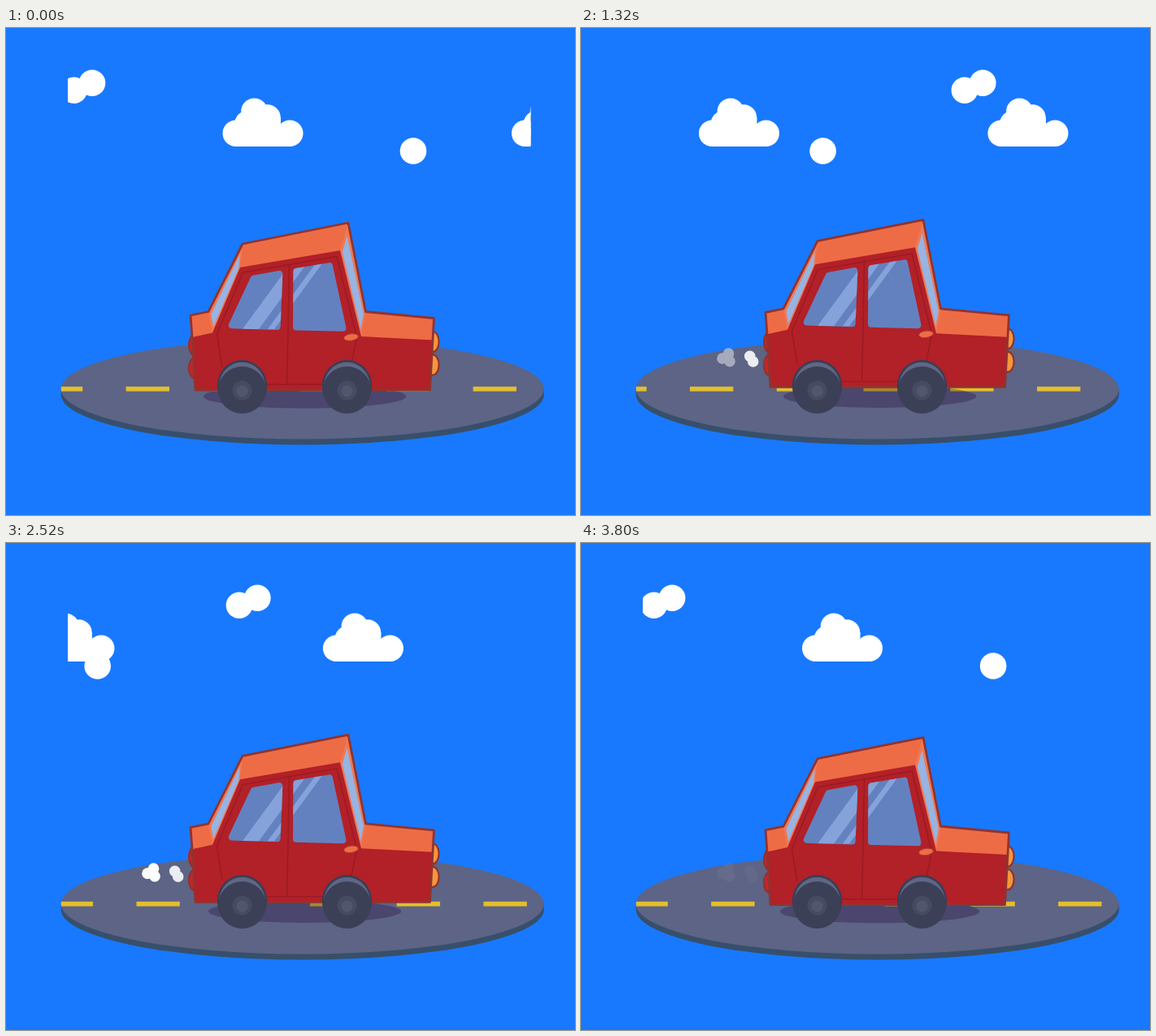
These frames come from a looping animation (700x600 px, 3840 ms). An HTML page with a canvas:

```html
<!DOCTYPE html>
<html lang="en">
<head>
<meta charset="utf-8">
<title>Car on the road</title>
<style>
html, body { margin: 0; width: 100%; height: 100%; overflow: hidden; background: #1879ff; }
canvas { display: block; }
</style>
</head>
<body>
<canvas id="stage" width="700" height="600"></canvas>
<script>
const ctx = document.getElementById('stage').getContext('2d');
const TAU = Math.PI * 2;
const LOOP = 3840, STEP = 40, BOUNCE = 480, PUFF = 960;
const RED = '#b22028', ORANGE = '#ee6c45', OUTLINE = '#91332f', SEAM = '#9a1a23';

// Corners of the car body; the near side has its own inner edge
const tail = [227, 354], deck = [249, 349.5], roofBack = [291, 266], roofFront = [421, 240];
const cowl = [442.5, 349.5], nose = [526.5, 357.5], frontFoot = [521.5, 446], rearFoot = [233, 446];
const sideTail = [229, 381], sideDeck = [254, 375.5], sideBack = [288, 295];
const sideFront = [411, 274], sideCowl = [437, 380], sideNose = [525, 384.5];
const cabin = [sideDeck, sideBack, sideFront, sideCowl];
const side = [sideTail, ...cabin, sideNose, frontFoot, rearFoot];
const hull = [tail, deck, roofBack, roofFront, cowl, nose, sideNose, frontFoot, rearFoot, sideTail];

const mix = (a, b, u) => [a[0] + (b[0] - a[0]) * u, a[1] + (b[1] - a[1]) * u];

function paint(fill, stroke, width) {
  if (fill) { ctx.fillStyle = fill; ctx.fill(); }
  if (stroke) { ctx.strokeStyle = stroke; ctx.lineWidth = width; ctx.stroke(); }
}

function ellipse(x, y, rx, ry, fill, stroke, width, angle = 0) {
  ctx.beginPath();
  ctx.ellipse(x, y, rx, ry, angle, 0, TAU);
  paint(fill, stroke, width);
}

function shape(points, fill, stroke, width) {
  ctx.beginPath();
  for (const p of points) ctx.lineTo(...p);
  ctx.closePath();
  paint(fill, stroke, width);
}

function line(points, color, width) {
  ctx.beginPath();
  for (const p of points) ctx.lineTo(...p);
  paint(null, color, width);
}

function clipped(draw) {
  ctx.save();
  draw();
  ctx.restore();
}

function ball(x, y) {
  ellipse(x, y, 16.3, 16.3, '#fff');
}

function cloud(x) {
  ball(x + 16.3, 129.7);
  ball(x + 82.7, 129.7);
  ball(x + 31, 118);
  ball(x + 39, 102.8);
  ball(x + 55, 110.6);
  ctx.fillRect(x + 16, 124, 67, 22);
  ctx.fillRect(x + 31, 110, 40.5, 30);
}

function drawSky(t) {
  ctx.fillStyle = '#1879ff';
  ctx.fillRect(0, 0, 700, 600);
  clipped(() => {
    ctx.beginPath();
    ctx.rect(76, 0, 569.5, 200);
    ctx.clip();
    for (const shift of [0, 355.5]) cloud(266.5 + shift - t * 0.0921);
    for (const shift of [0, 591.7]) {
      const x = shift - t * 0.1541;
      ball(83.6 + x, 76.8);
      ball(106 + x, 67.8);
      ball(501 + x, 151.5);
    }
  });
}

function drawRoad(t) {
  const x = 364.7, y = 444.7, rx = 297, ry = 61.8, depth = 7;
  ellipse(x, y + depth, rx, ry, '#374f6b');
  ctx.fillRect(x - rx, y, rx * 2, depth);
  ellipse(x, y, rx, ry, '#5d6485');
  clipped(() => {
    ctx.clip();
    const gap = 106.75, start = (147.6 - t * 0.3338) % gap - gap;
    ctx.fillStyle = '#e3be2e';
    for (let dash = start; dash < 700; dash += gap) ctx.fillRect(dash, 441.8, gap / 2, 5.8);
  });
  const phase = t % BOUNCE / BOUNCE;
  const scale = 1 - 0.096 * (1 - Math.abs(1 - 2 * phase));
  ellipse(367.6, 453.8, 124.7 * scale, 14.8 * scale, 'rgba(33,0,53,.3)');
}

// A ring of small overlapping balls, fading in and out over its life
function puff(x, y, count, spread, angle, life) {
  ctx.globalAlpha = life > 0 ? Math.sin(Math.PI * life) ** 1.6 : 0;
  ctx.beginPath();
  for (let i = 0; i < count; i++) {
    const a = angle + i * TAU / count;
    const cx = x + spread * Math.cos(a), cy = y + spread * Math.sin(a);
    ctx.moveTo(cx + 6.8, cy);
    ctx.arc(cx, cy, 6.8, 0, TAU);
  }
  paint('#fff');
  ctx.globalAlpha = 1;
}

function drawSmoke(t) {
  const delay = 160, last = delay + 3 * PUFF;
  const lateLife = t < last ? (t - delay) % PUFF / PUFF : (t - last) / (LOOP - last);
  puff(179.5, 406.3, 3, 5.6, -1.2, lateLife);
  puff(209.7, 407.7, 2, 3.9, 1.03, t % PUFF / PUFF);
}

// Slanted glass spanning most of the face between two edges
function glassFace(outerTop, outerEnd, innerTop, innerEnd) {
  shape([outerTop, outerEnd, innerEnd, innerTop], '#ef7955');
  const corner = (u, v) => mix(mix(outerTop, outerEnd, u), mix(innerTop, innerEnd, u), v);
  shape([corner(0.06, 0.28), corner(0.95, 0.28), corner(0.95, 0.87), corner(0.06, 0.87)], '#97b4e2');
}

function sideWindow(points) {
  clipped(() => {
    const n = points.length;
    ctx.beginPath();
    ctx.moveTo(...mix(points[n - 1], points[0], 0.5));
    points.forEach((p, i) => ctx.arcTo(...p, ...points[(i + 1) % n], 4));
    ctx.closePath();
    paint('#6481bf');
    ctx.clip();
    const glare = (x, width) =>
      shape([[x, 371], [x + width, 371], [x + width + 62, 286], [x + 62, 286]], '#85a3da');
    glare(291, 20);
    glare(322, 8);
  });
}

function drawBody() {
  for (const y of [386.5, 415]) {
    ellipse(525, y, 7.6, 12.5, '#f4963d', OUTLINE, 2.2);
    ellipse(231.5, y + 4, 6.5, 12.5, '#c3262c', OUTLINE, 2.2);
  }
  shape(hull, ORANGE);
  glassFace(roofBack, deck, sideBack, sideDeck);
  glassFace(roofFront, cowl, sideFront, sideCowl);
  shape(side, RED);
  shape(hull, null, OUTLINE, 2.8);

  const door = cabin.map(p => mix([346, 400], p, 0.94));
  line([[266, 418], ...door, [424, 418]], SEAM, 1.4);
  line([[348.5, 290], [347, 375], [345.5, 439]], SEAM, 1.4);
  line([[318, 439.3], [394, 439.3]], SEAM, 1.4);

  sideWindow([[302, 305], [340.5, 298], [337.5, 372], [271.5, 370]]);
  sideWindow([[353.5, 296.5], [401, 288.5], [419.5, 374], [353, 372.3]]);
  ellipse(424.5, 381, 9, 4.2, ORANGE, '#a83a2f', 1, -0.14);
}

function drawWheel(x) {
  ellipse(x, 441, 30.7, 32, '#393e55');
  ellipse(x, 441.5, 28.3, 29.8, '#5f6784');
  ellipse(x, 446, 29.5, 29, '#3b4057');
  ellipse(x, 446.5, 12, 12, '#474b60');
  ellipse(x, 447.5, 7, 7, '#52566c');
}

function draw(t) {
  drawSky(t);
  drawRoad(t);
  drawSmoke(t);
  clipped(() => {
    ctx.translate(0, -3.7 * (1 - Math.cos(t / BOUNCE * TAU)));
    drawBody();
  });
  drawWheel(290.5);
  drawWheel(419.5);
}

ctx.lineJoin = 'round';
const origin = performance.now();
function frame() {
  const elapsed = Math.max(0, performance.now() - origin) % LOOP;
  draw(Math.floor(elapsed / STEP) * STEP);
  requestAnimationFrame(frame);
}
frame();
</script>
</body>
</html>
```
